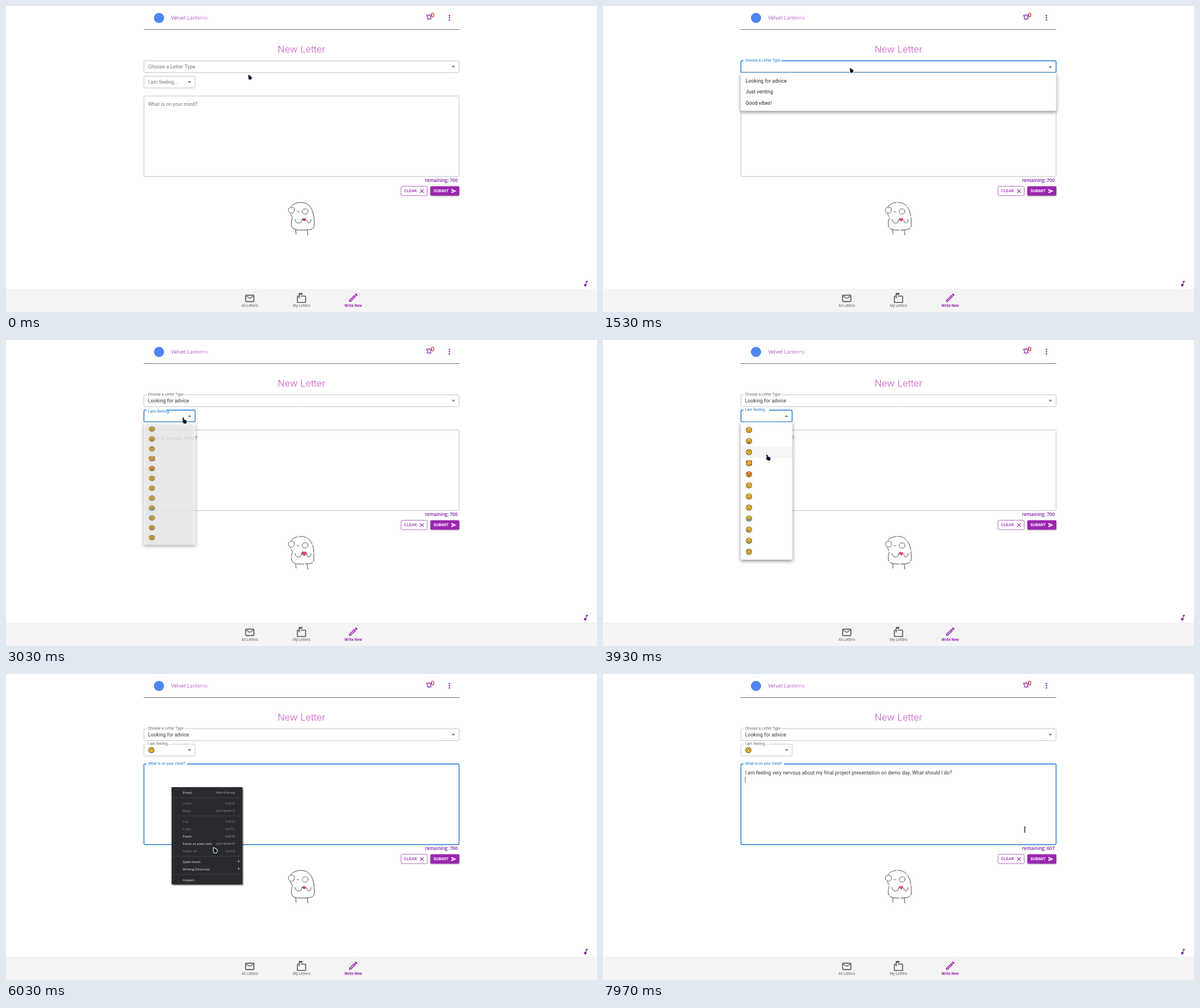
An HTML page with a canvas for the animation above (8 s loop, 1039 px wide and 539 px high).

```html
<!DOCTYPE html>
<html lang="en">
<head>
<meta charset="utf-8">
<title>New Letter</title>
<style>
html, body { margin: 0; height: 100%; overflow: hidden; background: #fff; }
canvas { display: block; }
</style>
</head>
<body>
<canvas id="stage" width="1039" height="539"></canvas>
<script>
const ctx = document.getElementById('stage').getContext('2d');
const LOOP = 8000;
const BLUE = '#1976d2', PURPLE = '#9c27b0', DEEP = '#7b1fa2', INK = '#212121';
const BODY = 8.67, SMALL = 6.5;

// Moments of the interaction, in ms
const OPEN_TYPE = 1000, PICK_TYPE = 2050, OPEN_MOOD = 2950, PICK_MOOD = 4360;
const FOCUS_NOTE = 5110, OPEN_CONTEXT = 5230, PASTE = 6500;

const ICONS = {
  mail: 'M22 6c0-1.1-.9-2-2-2H4c-1.1 0-2 .9-2 2v12c0 1.1.9 2 2 2h16c1.1 0 2-.9 2-2V6zm-2 0l-8 5-8-5h16zm0 12H4V8l8 5 8-5v10z',
  mailbox: 'M20 6H10v2h10v12H4V8h2v4h2V4h6V0H6v6H4c-1.1 0-2 .9-2 2v12c0 1.1.9 2 2 2h16c1.1 0 2-.9 2-2V8c0-1.1-.9-2-2-2z',
  pencil: 'M14.06 9.02l.92.92L5.92 19H5v-.92l9.06-9.06M17.66 3c-.25 0-.51.1-.7.29l-1.83 1.83 3.75 3.75 1.83-1.83c.39-.39.39-1.02 0-1.41l-2.34-2.34c-.2-.2-.45-.29-.71-.29zm-3.6 3.19L3 17.25V21h3.75L17.81 9.94l-3.75-3.75z',
  note: 'M12 3v10.55c-.59-.34-1.27-.55-2-.55-2.21 0-4 1.79-4 4s1.79 4 4 4 4-1.79 4-4V7h4V3h-6z',
  bell: 'M12 22c1.1 0 2-.9 2-2h-4c0 1.1.9 2 2 2zm6-6v-5c0-3.07-1.63-5.64-4.5-6.32V4c0-.83-.67-1.5-1.5-1.5s-1.5.67-1.5 1.5v.68C7.64 5.36 6 7.92 6 11v5l-2 2v1h16v-1l-2-2zm-2 1H8v-6c0-2.48 1.51-4.5 4-4.5s4 2.02 4 4.5v6zM7.58 4.08L6.15 2.65C3.75 4.48 2.17 7.3 2.03 10.5h2c.15-2.65 1.51-4.97 3.55-6.42zm12.39 6.42h2c-.15-3.2-1.73-6.02-4.12-7.85l-1.42 1.43c2.02 1.45 3.39 3.77 3.54 6.42z',
  cross: 'M19 6.4L17.6 5 12 10.6 6.4 5 5 6.4 10.6 12 5 17.6 6.4 19 12 13.4 17.6 19 19 17.6 13.4 12z',
  send: 'M2 21l21-9L2 3v7l15 2-15 2z',
};

const clamp = v => Math.max(0, Math.min(1, v));
const mix = (a, b, p) => a + (b - a) * p;
const easeOut = p => 1 - (1 - clamp(p)) ** 3;
const between = (t, a, b) => t >= a && t < b;

function text(s, x, y, size, color, { weight = 400, font = 'Roboto', align = 'left', spacing = 0 } = {}) {
  ctx.font = `${weight} ${size}px "${font}", sans-serif`;
  ctx.letterSpacing = spacing + 'px';
  ctx.textAlign = align;
  ctx.fillStyle = color;
  ctx.fillText(s, x, y);
}
const bodyText = (s, x, y, color = '#333', size = BODY) => text(s, x, y, size, color, { spacing: size * 0.0094 });

function box(x, y, w, h, fill, r = 0) {
  ctx.fillStyle = fill;
  ctx.beginPath();
  ctx.roundRect(x, y, w, h, r);
  ctx.fill();
}
function disc(x, y, r, fill) {
  ctx.fillStyle = fill;
  ctx.beginPath();
  ctx.arc(x, y, r, 0, 7);
  ctx.fill();
}
function line(d, color, width = 1) {
  ctx.strokeStyle = color;
  ctx.lineWidth = width;
  ctx.stroke(new Path2D(d));
}
function outline(x, y, w, h, color, width = 1) {
  ctx.strokeStyle = color;
  ctx.lineWidth = width;
  ctx.beginPath();
  ctx.roundRect(x, y, w, h, 2);
  ctx.stroke();
}
function fillPath(d, x, y, scale, color) {
  ctx.save();
  ctx.translate(x, y);
  ctx.scale(scale, scale);
  ctx.fillStyle = color;
  ctx.fill(new Path2D(d));
  ctx.restore();
}
function withShadow(blur, dx, dy, alpha, draw) {
  ctx.save();
  Object.assign(ctx, { shadowColor: `rgba(0,0,0,${alpha})`, shadowBlur: blur, shadowOffsetX: dx, shadowOffsetY: dy });
  draw();
  ctx.restore();
}

// Outlined input whose label floats up into the border
function field({ x, y, w, h, label, restY, gap, t, floatAt, blurAt, hover }) {
  const focused = between(t, floatAt, blurAt);
  const up = easeOut((t - floatAt) / 200);
  outline(x, y, w, h, focused ? BLUE : hover ? INK : '#c4c4c4', focused ? 1.4 : 1);
  if (t >= floatAt) box(x + 4.5, y - 1.5, gap * up, 3, '#fff');
  const color = focused ? BLUE : t >= blurAt ? '#666' : '#757575';
  bodyText(label, 249.7, mix(restY, y + 1.9, up), color, mix(BODY, SMALL, up));
}
function dropArrow(x, y, open) {
  const s = open ? -1 : 1;
  fillPath(`M-3.2 ${-1.5 * s}h6.4L0 ${1.7 * s}z`, x, y, 1, '#757575');
}

// Eyes: dot, line, heart; bend: mouth curvature
const MOODS = [
  { bend: 1.3 }, { bend: 2, grin: true }, { bend: 1.4, flipped: true }, { bend: 1.4, hearts: '#d32f2f', small: true },
  { bend: 2, grin: true, hearts: '#e53935' }, { bend: 0 }, { bend: 0.6, closed: true }, { bend: -0.9 },
  { bend: -1.6, closed: true, tears: 2 }, { bend: -1, tears: 1 }, { bend: 0, teeth: true }, { bend: -1.5, brows: true },
];
function emoji(x, y, { bend, grin, flipped, hearts, small, closed, tears = 0, teeth, brows }) {
  ctx.save();
  ctx.translate(x, y);
  if (flipped) ctx.rotate(Math.PI);
  disc(0, 0, 5.3, '#4a3a22');
  disc(0, 0, 4.4, '#ffc52e');
  for (const side of [-1, 1]) {
    if (hearts && !small) disc(side * 2.1, -1.3, 1.6, hearts);
    else if (closed) line(`M${side * 1.8 - 1} -1h2`, '#3b2c16', 0.8);
    else disc(side * 1.7, -1.1, 0.75, '#3b2c16');
    if (brows) line(`M${side * 0.7} -2l${side * 2} -1`, '#3b2c16', 0.7);
  }
  if (small) for (const [hx, hy] of [[-4, -3], [4, -3.4], [4, 2.5]]) disc(hx, hy, 1.4, hearts);
  for (let i = 0; i < tears; i++) box(i ? 1.2 : -3, 0, 1.8, tears > 1 ? 4.8 : 3.4, '#36a3e0', 0.9);
  if (teeth) { box(-2.6, 0.8, 5.2, 2.2, '#3b2c16', 0.8); box(-2, 1.4, 4, 0.9, '#fff'); }
  else {
    const mouth = `M-2.3 ${1.9 - bend / 3}Q0 ${1.9 + bend * 1.3} 2.3 ${1.9 - bend / 3}`;
    if (grin) fillPath(mouth + 'z', 0, 0, 1, '#3b2c16');
    line(mouth, '#3b2c16', 0.8);
  }
  ctx.restore();
}

function mascot(t) {
  const pose = Math.floor((t % 400) / (400 / 3));
  const heart = [0.85, 1.25, 1][pose];
  ctx.save();
  ctx.lineCap = 'round';
  if (pose) ctx.setLineDash(pose === 1 ? [13, 2.6] : [17, 2.4]);
  const right = pose === 1 ? 541 : 542;
  line(`M501 353C506 348 511 346 519 346C530 346 537 353 540 365C542 373 ${right} 380 ${right} 386
    C541 394 535 394 526 394.500C518 395 510 395 505 392C500 388 501 379 503.500 373.500L502 370L500 366`, '#333', 0.9);
  line('M509.300 394L510 402M529.600 394.500L530.600 403.500', '#333', 0.9);
  ctx.setLineDash([]);
  line(`M507 358C507 355 504 354 501 354.500C497 355 495.500 358 497 362C499 366 505 366 506.500 362Q507.300 360 507 358
    M531 362C531 358.500 528.500 357 525.500 357.300C521 357.500 520 362 521.500 364.500C524 368 531 367 531 362
    M511.500 361.500Q513.500 364.500 515 361.500`, '#333', 0.8);
  line(`M508 376C509 382 513 383 516.500 382C519 381 520 379 519.500 376.500Q521 375 523 377
    M526 377Q528 375.500 529 378C530 383 533.500 383 535.500 380Q536.500 378 536 376`, '#333', 0.9);
  const shape = 'M0 3.400L-3.200 .2C-4-2-1.500-3.600 0-1.300C1.500-3.600 4-2 3.200 .2z';
  fillPath(shape, 524, 376, heart, pose ? '#e8447c' : '#cf3a68');
  ctx.translate(524, 376);
  ctx.scale(heart, heart);
  line(shape, pose === 2 ? '#e8447c' : '#6b2a42', 0.6);
  ctx.restore();
}

function page(t) {
  disc(269, 21, 9, '#4f86f0');
  const brand = ctx.createLinearGradient(290, 0, 355, 0);
  brand.addColorStop(0, '#8023ac');
  brand.addColorStop(1, '#c45ad2');
  text('Velvet Lanterns', 290, 24.3, 9, brand, { weight: 300, font: 'Inter' });
  fillPath(ICONS.bell, 737.4, 13, 0.542, DEEP);
  text('0', 750, 20, 11.5, '#d32f2f', { weight: 500, align: 'center' });
  for (const y of [16.7, 20.6, 24.5]) disc(779.5, y, 1.25, DEEP);
  box(242, 41, 555, 1, '#707070');
  text('New Letter', 519.5, 82.4, 16.5, '#cd5fc7', { weight: 300, font: 'Inter', align: 'center' });

  text('remaining: ' + (t < PASTE ? 700 : 607), 794, 310, 8, DEEP, { weight: 600, font: 'Open Sans', align: 'right' });
  outline(694.5, 317.5, 46, 16.5, '#b566c4');
  text('CLEAR', 699.8, 328, 7.04, PURPLE, { weight: 500, spacing: 0.25 });
  fillPath(ICONS.cross, 725.2, 320, 0.5, DEEP);
  withShadow(2.5, 0, 1, 0.4, () => box(746, 317.5, 51, 16.5, PURPLE, 2));
  text('SUBMIT', 751.5, 328, 7.04, '#fff', { weight: 700, spacing: 0.15 });
  fillPath(ICONS.send, 782.3, 321, 0.42, '#fff');
  mascot(t);

  fillPath(ICONS.note, 1013, 482.6, 0.54, DEEP);
  box(0, 498, 1039, 41, '#f4f4f4');
  fillPath(ICONS.mail, 418.9, 505.4, 0.8, '#555');
  fillPath(ICONS.mailbox, 509.9, 505.4, 0.8, '#555');
  fillPath(ICONS.pencil, 600.8, 504, 0.81, PURPLE);
  text('All Letters', 428.5, 530.2, SMALL, '#666', { align: 'center' });
  text('My Letters', 519.5, 530.2, SMALL, '#666', { align: 'center' });
  text('Write New', 610.5, 529.8, SMALL, PURPLE, { weight: 700, align: 'center', spacing: 0.1 });
}

function form(t) {
  field({ x: 242.5, y: 96.5, w: 554, h: 20.8, label: 'Choose a Letter Type', restY: 110, gap: 67,
    t, floatAt: OPEN_TYPE, blurAt: OPEN_MOOD, hover: between(t, 250, OPEN_TYPE) });
  dropArrow(786.5, 107, between(t, OPEN_TYPE, PICK_TYPE));
  if (t >= PICK_TYPE) bodyText('Looking for advice', 249.7, 110);

  field({ x: 242.5, y: 123.5, w: 90, h: 20.8, label: 'I am feeling...', restY: 137, gap: 45,
    t, floatAt: OPEN_MOOD, blurAt: FOCUS_NOTE, hover: between(t, 2700, OPEN_MOOD) });
  dropArrow(322.8, 134, between(t, OPEN_MOOD, PICK_MOOD));
  if (t >= PICK_MOOD) emoji(255.6, 134, MOODS[2]);

  field({ x: 242.5, y: 158.5, w: 554, h: 142, label: 'What is on your mind?', restY: 176, gap: 71,
    t, floatAt: FOCUS_NOTE, blurAt: LOOP, hover: between(t, 4500, FOCUS_NOTE) });
  if (t >= PASTE) {
    bodyText('I am feeling very nervous about my final project presentation on demo day. What should I do?', 249.7, 176.7);
    if (Math.floor((t - PASTE) / 520) % 2 === 0) box(249.7, 181, 0.8, 10, '#333');
  }
}

function dropdown(t, openAt, closeAt, y, w, h, rows) {
  if (!between(t, openAt, closeAt + 200)) return;
  const grow = easeOut((t - openAt) / 230);
  ctx.save();
  ctx.globalAlpha = grow * (1 - clamp((t - closeAt) / 200));
  ctx.translate(0, y);
  ctx.scale(1, mix(0.6, 1, grow));
  withShadow(6, 0, 2.5, 0.45, () => box(242, 0, w, h, '#fff', 2));
  rows();
  ctx.restore();
}

function dropdowns(t) {
  dropdown(t, OPEN_TYPE, PICK_TYPE, 117.5, 555, 67.3, () => {
    if (t > 1880) box(242, 4.3, 555, 19.5, '#f5f5f5');
    ['Looking for advice', 'Just venting', 'Good vibes!'].forEach((s, i) => bodyText(s, 250.8, 17 + 19.5 * i, INK));
  });
  dropdown(t, OPEN_MOOD, PICK_MOOD, 144.5, 91, 242.5, () => {
    const row = Math.floor((cursorAt(t).y - 148.8) / 19.5);
    if (row >= 0) box(242, 4.3 + 19.5 * row, 91, 19.5, '#f5f5f5');
    MOODS.forEach((mood, i) => emoji(256.6, 14 + 19.5 * i, mood));
  });
}

// Label, shortcut, row centre, enabled
const COMMANDS = [
  ['Emoji', 'Win+Period', 208.5, 1], ['Undo', 'Ctrl+Z', 227.5, 0], ['Redo', 'Ctrl+Shift+Z', 240.5, 0],
  ['Cut', 'Ctrl+X', 259.5, 0], ['Copy', 'Ctrl+C', 272.5, 0], ['Paste', 'Ctrl+V', 285.5, 1],
  ['Paste as plain text', 'Ctrl+Shift+V', 298.5, 1], ['Select all', 'Ctrl+A', 311.5, 0],
  ['Spell check', '>', 330.5, 1], ['Writing Direction', '>', 343.5, 1], ['Inspect', '', 362.5, 1],
];
function contextMenu(t) {
  if (!between(t, OPEN_CONTEXT, PASTE)) return;
  const { x, y } = cursorAt(t), font = 'Open Sans';
  withShadow(2, 1.5, 1.5, 0.6, () => box(291, 199.3, 124.5, 171.2, '#292a2d'));
  for (const sep of [218, 250, 321, 353]) box(291, sep - 0.5, 124.5, 1, '#3f4043');
  for (const [label, keys, mid, on] of COMMANDS) {
    if (on && x > 295 && Math.abs(y - mid) < 6.5) box(291, mid - 6.5, 124.5, 13, '#3f4043');
    text(label, 310.8, mid + 2.2, 6.1, on ? '#f1f1f1' : '#85868a', { font });
    if (keys === '>') fillPath('M0-2L2.400 0L0 2z', 408.3, mid - 0.5, 1, '#ccc');
    else text(keys, 402.5, mid + 2.2, 6.1, on ? '#b4b5b8' : '#929397', { font, align: 'right' });
  }
}

// Time, x, y of the pointer tip
const PATH = [
  [0, 426, 121], [100, 426, 121], [450, 431, 110], [900, 435, 107], [1530, 434, 109], [1700, 425, 112],
  [1950, 352, 131], [2100, 350, 132], [2430, 344, 139], [2800, 312, 136], [3450, 306, 139],
  [3930, 287, 202], [4250, 282, 198], [4450, 282, 198], [4970, 291, 200], [5300, 291, 200],
  [6030, 365, 306], [6350, 335, 285], [6600, 335, 285], [7200, 352, 274], [7690, 378, 262], [7970, 741.5, 274],
];
function cursorAt(t) {
  const i = PATH.findIndex(k => k[0] > t);
  if (i < 0) return { x: 741.5, y: 274 };
  const [t0, x0, y0] = PATH[i - 1], [t1, x1, y1] = PATH[i];
  const p = (t - t0) / (t1 - t0), e = p * p * (3 - 2 * p);
  return { x: mix(x0, x1, e), y: mix(y0, y1, e) };
}

const ARROW = 'M0 0L5.600 3.400L6.300 5.600L4.800 8.600L1.200 8.800L.3 7z';
const HAND = 'M0 0C1-.7 2 0 2.400 1.200L3.300 3.600L6.200 4.300Q7.800 5 7.400 7L6.600 10.300H2.600L-1 6.600Q-1 5.300 1 5.700z';
function pointer(t) {
  const { x, y } = cursorAt(t);
  const beam = between(t, 4500, OPEN_CONTEXT) || t >= PASTE;
  const hand = between(t, 250, OPEN_TYPE) || between(t, 1880, 2200) || between(t, 2700, 4500);
  if (beam) return box(x - 0.7, y - 5.5, 1.4, 11, '#111');
  ctx.save();
  ctx.translate(x, y);
  const shape = hand ? HAND : ARROW;
  ctx.lineJoin = 'round';
  line(shape, '#fff', 2);
  fillPath(shape, 0, 0, 1, '#0c1230');
  ctx.restore();
}

function draw(now) {
  const t = now % LOOP;
  ctx.fillStyle = '#fff';
  ctx.fillRect(0, 0, 1039, 539);
  page(t);
  form(t);
  dropdowns(t);
  contextMenu(t);
  pointer(t);
  requestAnimationFrame(draw);
}
requestAnimationFrame(draw);
</script>
</body>
</html>
```
